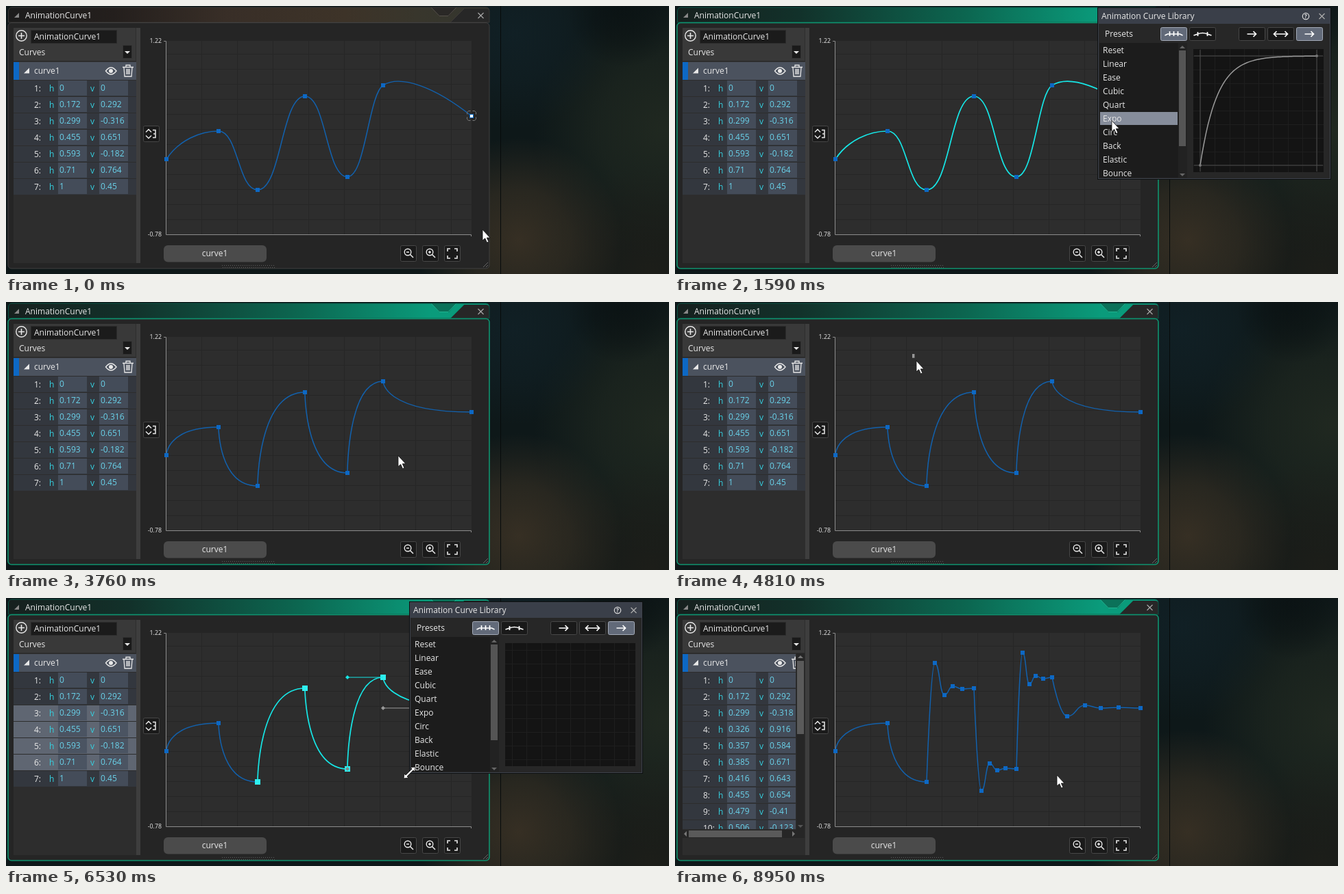
An HTML page for the animation above (9.46 s loop, 967 by 392 pixels).

```html
<!DOCTYPE html>
<html lang="en">
<head>
<meta charset="utf-8">
<title>Curve editor</title>
<style>
  html, body { margin: 0; width: 100%; height: 100%; overflow: hidden; background: #0e1819; }
  svg { display: block; width: 967px; height: 392px; }
  text { font: 12px "Open Sans", "Noto Sans", sans-serif; white-space: pre; }
</style>
</head>
<body>
<svg id="stage" viewBox="0 0 967 392" xmlns="http://www.w3.org/2000/svg"></svg>
<script>
const LOOP = 9460;
const BLUE = '#0d68c4', DARK_BLUE = '#1261ad', CYAN = '#16e6e6', LIGHT = '#e8e8e8', GREY = '#9a9a9a';

// ---------- markup helpers ----------
const rect = (x, y, w, h, fill, more = '') =>
  `<rect x="${x}" y="${y}" width="${w}" height="${h}" fill="${fill}" ${more}/>`;
const path = (d, stroke, width = 1, more = 'fill="none"') =>
  `<path d="${d}" stroke="${stroke}" stroke-width="${width}" ${more}/>`;
const shape = (d, fill) => `<path d="${d}" fill="${fill}"/>`;
const text = (x, y, s, fill = LIGHT, more = '') =>
  `<text x="${x}" y="${y}" fill="${fill}" ${more}>${s}</text>`;
const group = (x, y, body) => `<g transform="translate(${x} ${y})">${body}</g>`;
const repeat = (n, fn) => Array.from({ length: n }, (_, i) => fn(i)).join('');
const square = (p, size, fill, more) =>
  rect(p[0] - size / 2, p[1] - size / 2, size, size, fill, more);
const diamond = (p, fill) => shape(`M${p[0] - 3} ${p[1]}l3-3 3 3-3 3z`, fill);
const line = (a, b, stroke) => path(`M${a}L${b}`, stroke, 1.2);

// ---------- background ----------
const glow = (id, cx, cy, r, color, opacity = 1) =>
  `<radialGradient id="${id}" gradientUnits="userSpaceOnUse" cx="${cx}" cy="${cy}" r="${r}">
   <stop offset="0" stop-color="${color}" stop-opacity="${opacity}"/>
   <stop offset=".5" stop-color="${color}" stop-opacity="${opacity * .65}"/>
   <stop offset="1" stop-color="${color}" stop-opacity="0"/></radialGradient>`;
const ramp = (id, stops) =>
  `<linearGradient id="${id}">${stops.map(([o, c]) => `<stop offset="${o}" stop-color="${c}"/>`).join('')}</linearGradient>`;
const glows = [
  ['g0', 960, 180, 190, '#222a21', .9],
  ['g1', 940, 390, 160, '#201f19', .8],
  ['g2', 740, 40, 140, '#12232a', .7],
  ['g3', 748, 342, 150, '#383024', .95],
  ['g4', 900, 10, 80, '#0a1112', .7]
];

function background() {
  return `<defs>${glows.map(g => glow(...g)).join('')}
    ${ramp('idle', [[0, '#1c1c1c'], [.22, '#241f1d'], [.45, '#382e27'], [.7, '#3d3328'], [.85, '#38362c'], [1, '#33352e']])}
    ${ramp('live', [[0, '#16201e'], [.25, '#12312a'], [.6, '#0c6650'], [.88, '#0a9b7b'], [1, '#0a9b7b']])}
    <clipPath id="rows"><rect x="11" y="81" width="165" height="257"/></clipPath></defs>` +
    rect(0, 0, 967, 392, '#0e1819') +
    glows.map(g => rect(0, 0, 967, 392, `url(#${g[0]})`)).join('') +
    rect(721, 0, 1, 392, '#070b0b');
}

// ---------- main window ----------
function frame(active) {
  const title = 'M3.5 24V8Q3.5 2 9 2H700Q705 2 705 8V24Z';
  const fold = active ? '#0b7159' : '#2a2826';
  const rim = active ? '#20b28f' : '#55504a';
  return shape(title, `url(#${active ? 'live' : 'idle'})`) +
    shape('M648 24L668 4H700Q705 4 705 9V24Z', '#272727') +
    path('M648 24L668 4', active ? '#0a7a60' : '#3d3a37') +
    shape('M620 2H657L646 15H632Z', fold) +
    path('M620 2L632 14.5H645L657 2', rim) +
    path(title, active ? '#0c5545' : '#3a3836') +
    rect(3, 24.5, 702, 359.5, '#252525', `rx="5" stroke="${active ? '#0f936f' : '#414141'}" stroke-width="${active ? 1.6 : 1}"`) +
    shape('M12 17H19V10Z', '#888') +
    text(28, 17.5, 'AnimationCurve1') +
    path('M688.5 10l8 8m0-8l-8 8', '#a8a8a8', 1.2);
}

const iconButton = (x, y, body) =>
  group(x, y, rect(.5, .5, 23, 23, '#1a1a1a', 'rx="2" stroke="#474747"') + body);
const lens = sign =>
  `<circle cx="11" cy="10" r="4.8" fill="none" stroke="${LIGHT}" stroke-width="1.4"/>` +
  path(`M14.5 13.5L19 18M9 10h4${sign}`, LIGHT, 1.5);

function chrome() {
  return rect(11, 32, 185, 344, '#2d2d2d') +
    rect(190, 32, 6, 344, '#3e3e3e') +
    rect(11, 32, 178, 48, '#393939') +
    `<circle cx="22.5" cy="43.5" r="7.7" fill="none" stroke="${LIGHT}" stroke-width="1.4"/>` +
    path('M18 43.5h9m-4.5-4.5v9', LIGHT, 1.6) +
    rect(36.5, 35.5, 125, 19, '#1b1b1b', 'stroke="#2b2b2b"') +
    text(41, 49, 'AnimationCurve1') +
    text(19, 72, 'Curves') +
    rect(170.5, 57.5, 13, 19, '#1a1a1a', 'stroke="#333"') +
    shape('M173 66h8l-4 4z', LIGHT) +
    rect(234, 51, 445, 283, '#2d2d2d') +
    repeat(8, i => rect(285 + 52 * i, 51, 1, 283, '#262626')) +
    repeat(12, i => rect(234, 70 + 22 * i, 445, 1, '#262626')) +
    path('M230 51.5H233.5V334.5H678.5V337', '#8c8c8c') +
    text(227, 54, '1.22', LIGHT, 'text-anchor="end" style="font-size:8.8px"') +
    text(227, 337, '-0.78', LIGHT, 'text-anchor="end" style="font-size:8.8px"') +
    iconButton(200, 175, path('M4 9.5l4-4 4 4M4 14.5l4 4 4-4M14 6.5h4v11h-4M15 12h3', LIGHT, 1.5)) +
    rect(230, 350, 150, 24.5, '#4b4b4b', 'rx="6"') +
    text(304.5, 366, 'curve1', LIGHT, 'text-anchor="middle"') +
    iconButton(575, 350, lens('')) +
    iconButton(607, 350, lens('m-2-2v4')) +
    iconButton(639, 350, path('M5 9V5h4m6 0h4v4m0 6v4h-4m-6 0H5v-4', LIGHT, 1.6)) +
    path('M315 379.5H393M316 382.5H393', '#5d5d5d', 1, 'stroke-dasharray="1 2"') +
    path('M696 382l7-7m-3 7l3-3', '#666');
}

// ---------- curve data ----------
const H = [0, .172, .299, .455, .593, .71, 1];
const V = [0, .292, -.316, .651, -.182, .764, .45];
const V_BOUNCED = [0, .292, -.318, .654, -.184, .764, .45];
const WOBBLE = [[.174, 1.27], [.371, .9275], [.55, 1.0175], [.752, .9887]];
const at = ([h, v]) => [Math.round(233.7 + 445 * h), Math.round(224.2 - 141.5 * v)];

const keys = H.map((h, i) => [h, V[i]]);
const wobbly = H.flatMap((h, i) => {
  const key = [h, V_BOUNCED[i]];
  if (i < 2 || i > 5) return [key];
  const dh = H[i + 1] - h, dv = V_BOUNCED[i + 1] - key[1];
  return [key, ...WOBBLE.map(([a, b]) => [h + a * dh, key[1] + b * dv])];
});

// Handles of one segment for each curve style
function handles(style, i, a, b) {
  const mid = (a[0] + b[0]) / 2;
  if (style === 'smooth') {
    if (i === 0) return [[252, 196], [284, 183]];
    if (i === 4) return [[mid, a[1]], [529, 129]];
    if (i === 5) return [[575, 100], [625, 118]];
    return [[mid, a[1]], [mid, b[1]]];
  }
  if (style === 'quart' || i < 2) return [a, [a[0], b[1]]];
  return [(i - 2) % 5 ? [mid, a[1]] : a, [mid, b[1]]];
}

function graph(s) {
  const pts = s.points.map(at), segs = [], marks = [];
  for (let i = 0; i < pts.length - 1; i++) {
    const [c1, c2] = handles(s.style, i, pts[i], pts[i + 1]);
    const lit = s.lit || s.selected(i);
    segs.push(path(`M${pts[i]}C${c1} ${c2} ${pts[i + 1]}`, lit ? CYAN : DARK_BLUE, lit ? 1.7 : 1.5));
  }
  pts.forEach((p, i) => marks.push(s.selected(i) ? square(p, 8, '#2ef0f0') : square(p, 6, BLUE)));

  let last = -1;
  pts.forEach((p, i) => { if (s.selected(i)) last = i; });
  if (s.style === 'quart' && last > 0) {
    const [prev, cur, next] = pts.slice(last - 1, last + 2);
    const back = [prev[0], cur[1]], ahead = [cur[0], next[1]];
    marks.push(line(back, cur, CYAN), diamond(back, CYAN), diamond(prev, '#7c8a8a'),
      line(ahead, next, GREY), diamond(ahead, GREY));
    if (!s.selected(last + 1)) marks.push(square(next, 5, '#2d2d2d', 'stroke="#ccc"'));
  }
  if (s.focusEnd) {
    marks.push(square(pts[6], 5, '#fff', `stroke="${BLUE}"`),
      path('M672.5 158.5v-3l2-2h3m3 0h3l2 2v3m0 4v3l-2 2h-3m-3 0h-3l-2-2v-3', '#777'));
  }
  const box = s.box ? rect(346, 76, Math.max(1, s.box[0] - 346), Math.max(1, s.box[1] - 76), '#979797') : '';
  return box + segs.join('') + marks.join('');
}

// ---------- key list ----------
function row(i, [h, v], on) {
  const y = 109 + 24 * i, field = on ? '#4b5462' : '#444c59';
  const cell = (x, name, n) => text(x, y + 15.5, name, '#35d0e0') + rect(x + 13, y, 42, 22, field) +
    text(x + 15, y + 15, +n.toFixed(3), '#6ad2ea');
  return rect(11, y, 179, 23, on ? '#5f6672' : '#33373e') +
    text(41, y + 15.5, i + 1 + ':') + cell(63, 'h', h) + cell(123, 'v', v);
}

function list(s) {
  const long = s.points.length > 7;
  const body = rect(11, 82, 179, 26, '#4b525e') + rect(11, 82, 8, 26, BLUE) +
    shape('M26 98.5H34V90.5Z', LIGHT) + text(41, 99, 'curve1') +
    path('M145.5 95Q153 85 161 95Q153 105 145.5 95Z', LIGHT, 1.4) +
    `<circle cx="153" cy="95" r="3" fill="${LIGHT}"/>` +
    path('M170 89.5H186M175 89V86.5H181V89M172 90L173 103H183L184 90M176 92V100M178 92V100M180 92V100', LIGHT, 1.3) +
    s.points.slice(0, 10).map((p, i) => row(i, p, s.selected(i))).join('');
  if (!long) return body;
  return `<g clip-path="url(#rows)">${body}</g>` +
    rect(177, 81, 12, 258, '#262626') + rect(178, 92, 10, 107, '#5a5a5a') +
    shape('M179 88h8l-4-4z', '#777') + shape('M179 332h8l-4 4z', '#555') +
    rect(11, 339, 178, 12, '#262626') + rect(20, 340, 136, 10, '#5a5a5a') +
    shape('M17 341v8l-4-4z', '#777') + shape('M171 341v8l4-4z', '#777');
}

// ---------- preset library ----------
const PRESETS = ['Reset', 'Linear', 'Ease', 'Cubic', 'Quart', 'Expo', 'Circ', 'Back', 'Elastic', 'Bounce'];
const bounce = x => {
  const k = 7.5625, d = 2.75;
  const [shift, base] = x < 1 / d ? [0, 0] : x < 2 / d ? [1.5, .75] : x < 2.5 / d ? [2.25, .9375] : [2.625, .984375];
  return k * (x - shift / d) ** 2 + base;
};
const EASE_OUT = {
  Linear: x => x,
  Ease: x => Math.sin(x * Math.PI / 2),
  Cubic: x => 1 - (1 - x) ** 3,
  Expo: x => 1 - 2 ** (-10 * x),
  Circ: x => Math.sqrt(1 - (x - 1) ** 2),
  Back: x => 1 + 2.7 * (x - 1) ** 3 + 1.7 * (x - 1) ** 2,
  Elastic: x => x ? 2 ** (-10 * x) * Math.sin((10 * x - .75) * 2 * Math.PI / 3) + 1 : 0,
  Bounce: bounce
};

function preview(name) {
  if (!name || name === 'Reset') return '';
  const over = name === 'Elastic' ? 1.38 : name === 'Back' ? 1.11 : 1;
  const top = 230 - 160 / over;
  const fn = EASE_OUT[name];
  const d = fn
    ? 'M' + Array.from({ length: 61 }, (_, i) => [149 + 170 * i / 60, 230 - 160 / over * fn(i / 60)].map(n => n.toFixed(1))).join('L')
    : 'M149 230C149 230 149 70 319 70';
  return path(`M149 61V239M319 61V239M140 ${top}H328M140 230H328`, '#4d4d4d') + path(d, GREY, 1.5) +
    `<circle cx="149" cy="230" r="2" fill="#777"/><circle cx="319" cy="${top}" r="2" fill="#777"/>`;
}

const toolButton = (x, on, d) =>
  rect(x + .5, 28.5, 38, 19, on ? '#626a79' : '#191919', `rx="2" stroke="${on ? '#a4abb8' : '#474747'}"`) +
  group(x + 19.5, 38, path(d, '#fff', 1.7));

function library(pos, hover) {
  if (!pos) return '';
  const right = 'M-7 0H6m-4-4l4 4-4 4';
  return group(...pos,
    rect(-1, -1, 341, 252, '#0d0f10') +
    rect(0, 0, 339, 249, '#272727') + rect(0, 0, 339, 23, '#3a3f49') +
    rect(.5, .5, 338, 249, 'none', 'stroke="#3d424b"') +
    text(5, 16, 'Animation Curve Library') +
    '<circle cx="303" cy="12" r="4.7" fill="none" stroke="#ddd" stroke-width="1.2"/>' +
    text(303, 15, '?', LIGHT, 'text-anchor="middle" style="font-size:8px;font-weight:700"') +
    path('M322.5 8l8 8m0-8l-8 8', '#aaa', 1.3) +
    text(10, 42, 'Presets') +
    toolButton(91, true, 'M-13 2l4-2H9l4 2M-6-4v7M0-4v7M6-4v7') +
    toolButton(133, false, 'M-13 2l6-2Q0-3 7 0l6 2M-7-3v6M7-3v6') +
    toolButton(205, false, right) +
    toolButton(247, false, 'M-10 0H10m-4-4l4 4-4 4M-6-4l-4 4 4 4') +
    toolButton(289, true, right) +
    rect(2, 51, 115, 197, '#1c1c1c') + rect(117, 51, 13, 197, '#222') +
    rect(118, 62, 10, 140, '#555') +
    shape('M119 59h8l-4-4z', '#666') + shape('M119 242h8l-4 4z', '#666') +
    PRESETS.map((name, i) =>
      (name === hover ? rect(3, 52 + 20 * i, 113, 19, '#868d9b') : '') + text(7, 66 + 20 * i, name)).join('') +
    rect(139, 60, 190, 180, '#141414') +
    repeat(9, i => rect(149 + Math.round(21.25 * i), 60, 1, 180, '#1e1e1e')) +
    repeat(9, i => rect(139, 70 + 20 * i, 190, 1, '#1e1e1e')) +
    preview(hover));
}

// ---------- pointer ----------
// Each move: start, end, steps, then [progress, x, y] stops
const MOVES = [
  [50, 650, 13, [0, 695, 327], [1, 616, 253]],
  [1130, 1900, 16, [0, 616, 253], [.9, 643, 143]],
  [2460, 3100, 15, [0, 643, 143], [.333, 632.5, 155], [1, 574, 226]],
  [3760, 4550, 18, [0, 574, 226], [1, 346, 76]],
  [4810, 5470, 15, [0, 346, 76], [.067, 352, 86], [.733, 555, 268], [1, 572, 288]],
  [5700, 6300, 14, [0, 572, 288], [1, 588, 255]],
  [6910, 7270, 9, [0, 588, 255], [1, 612, 228]],
  [8260, 8950, 15, [0, 612, 228], [.93, 557, 259]]
];

function along(stops, p) {
  const last = stops[stops.length - 1];
  if (p >= last[0]) return last.slice(1);
  const i = stops.findIndex(s => s[0] > p), a = stops[i - 1], b = stops[i];
  let k = (p - a[0]) / (b[0] - a[0]);
  if (stops.length === 2) k = k * k * (3 - 2 * k);
  return [a[1] + (b[1] - a[1]) * k, a[2] + (b[2] - a[2]) * k];
}

function pointerAt(t, lag = 0) {
  const move = MOVES.filter(m => m[0] <= t).pop();
  if (!move) return MOVES[0][3].slice(1);
  const [t0, t1, n, ...stops] = move;
  const step = Math.min(n - 1, Math.floor((t - t0) / (t1 - t0) * (n - 1) + .05));
  return along(stops, Math.max(0, (step + 1) / n - lag));
}

function pointer([x, y], resizing) {
  const arrow = 'M0 0V16L3.7 12.8L6.5 19L9 18L6.3 12H11Z';
  const diagonal = 'M-8 9L-7 2L-5 4L4-5L2-7L9-8L8-1L6-3L-3 6L-1 8Z';
  return group(x, y, path(resizing ? diagonal : arrow, '#111', .8, 'fill="#fff"'));
}

// ---------- state by time ----------
const within = (t, a, b) => t >= a && t < b;

function stateAt(t) {
  const cursor = pointerAt(t);
  const popup = within(t, 800, 3250) ? [617, 3] : within(t, 6530, 8950) ? [589, 6] : null;
  const style = t < 1900 ? 'smooth' : t < 7520 ? 'quart' : 'elastic';
  const points = style === 'elastic' ? wobbly : keys;
  const resizing = within(t, 800, 1130) || within(t, 6530, 6910);

  let selected = () => false;
  if (within(t, 1900, 3250)) selected = i => i < 6;
  else if (within(t, 4810, 7520)) {
    const [cx, cy] = t < 5700 ? cursor : [572, 288];
    selected = i => {
      const [x, y] = at(points[i]);
      return x > 346 && x < cx + 5 && y > 76 && y < cy + 5;
    };
  } else if (within(t, 7520, 8950)) selected = i => i > 1 && i < points.length - 1;

  let hover = null;
  if (popup && !resizing) {
    const x = cursor[0] - popup[0], y = cursor[1] - popup[1];
    if (x > 1 && x < 117 && y > 53 && y < 248) hover = PRESETS[Math.floor((y - 53) / 20)];
  }
  return {
    cursor, popup, style, points, resizing, selected, hover,
    active: t >= 650,
    focusEnd: t < 650,
    lit: within(t, 800, 1900),
    box: within(t, 4810, 5700) ? pointerAt(t, .028) : null
  };
}

// ---------- drawing ----------
const stage = document.getElementById('stage');
stage.innerHTML = background() + '<g></g>' + chrome() + '<g></g>'.repeat(4);
const layers = [...stage.children].filter(el => el.tagName === 'g' && !el.hasAttribute('transform'));
const shown = [];

function draw(t) {
  const s = stateAt(t);
  [frame(s.active), list(s), graph(s), library(s.popup, s.hover), pointer(s.cursor, s.resizing)]
    .forEach((markup, i) => {
      if (shown[i] !== markup) layers[i].innerHTML = shown[i] = markup;
    });
}

const start = performance.now();
function tick() {
  draw((performance.now() - start) % LOOP);
  requestAnimationFrame(tick);
}
draw(0);
requestAnimationFrame(tick);
</script>
</body>
</html>
```
